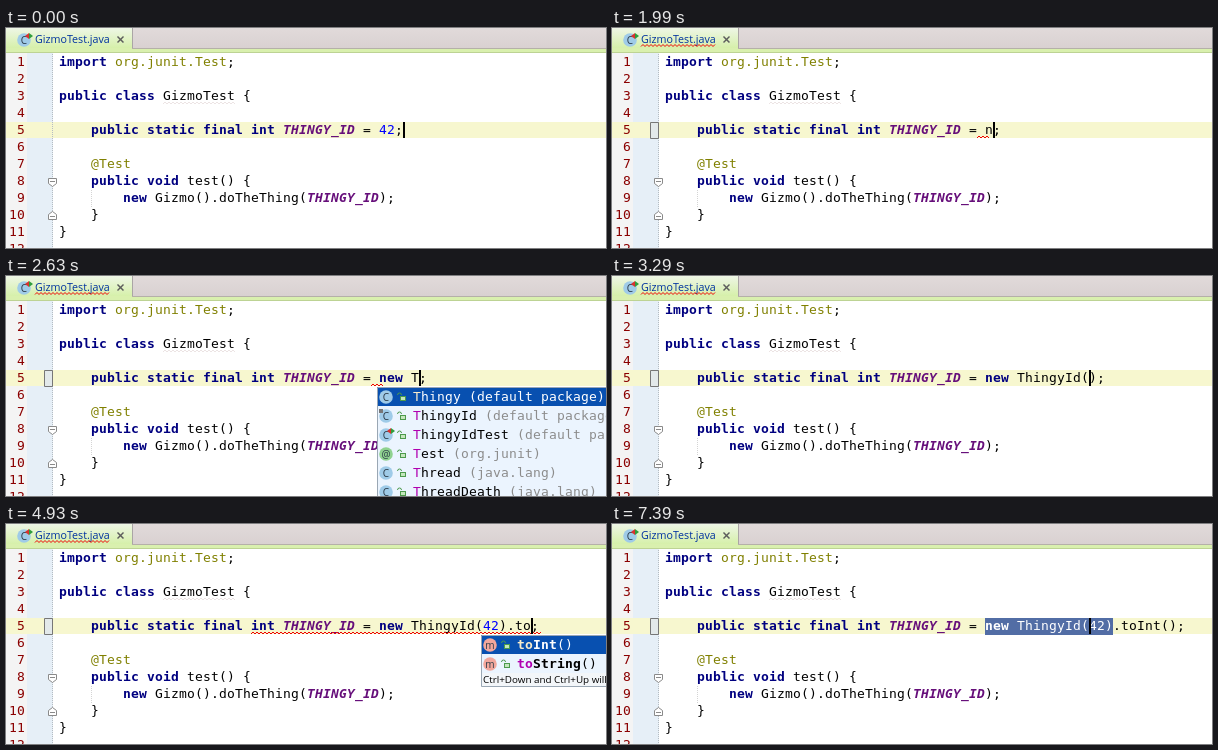
Animation, 600 px wide and 220 px high, one loop 8 s. Source, as an HTML page with a canvas:

```html
<!DOCTYPE html>
<html lang="en">
<head>
<meta charset="utf-8">
<title>Editor typing</title>
<style>
html, body { margin: 0; width: 100%; height: 100%; overflow: hidden; background: #fff; }
canvas { display: block; }
</style>
</head>
<body>
<canvas id="stage" width="600" height="220"></canvas>
<script>
const ctx = document.getElementById('stage').getContext('2d');
const LOOP = 8000, CELL = 8, ROW = 17, ASCENT = 12, LEFT = 53, EXPR = 373, CARET_ROW = 5;
const MONO = '13px "DejaVu Sans Mono", monospace';
const UI = '"Open Sans", sans-serif';
const ERROR = '#f00000';

// token styles: [font prefix, colour]
const STYLE = {
  k: ['bold ', '#000080'],
  c: ['bold italic ', '#660e7a'],
  a: ['', '#808000'],
  n: ['', '#0000ff'],
  p: ['', '#000']
};

const LINES = [
  [['k', 'import '], ['a', 'org.junit.Test'], ['p', ';']],
  [],
  [['k', 'public class '], ['p', 'GizmoTest {']],
  [],
  [['k', '    public static final int '], ['c', 'THINGY_ID'], ['p', ' =']],
  [],
  [['a', '    @Test']],
  [['k', '    public void '], ['p', 'test() {']],
  [['k', '        new '], ['p', 'Gizmo().doTheThing('], ['c', 'THINGY_ID'], ['p', ');']],
  [['p', '    }']],
  [['p', '}']]
];

// popup items: [icon, name, tail, matched prefix letters, mark]
const pkg = ' (default package)';
const method = (name, tail = '()', hit = 0) => ['m', name, tail, hit ? [0, 1] : []];
const POPUPS = {
  ne: { x: 337, items: [
    ['', 'new', '', [0, 1]],
    ['C', 'NegativeArraySizeException', ' (java.lang)', [0, 1]],
    ['C', 'NoSuchFieldError', ' (java.lang)', [0]],
    ['C', 'NoSuchMethodError', ' (java.lang)', [0]],
    ['C', 'NumberFormatException', ' (java.lang)', [0]],
    ['C', 'NullPointerException', ' (java.lang)', [0]]] },
  new: { x: 337, hint: true, items: [['', 'new', '', [0, 1, 2]]] },
  T: { x: 371, items: [
    ['C', 'Thingy', pkg, [0]],
    ['C', 'ThingyId', pkg, [0], 'pin'],
    ['C', 'ThingyIdTest', pkg, [0], 'run'],
    ['@', 'Test', ' (org.junit)', [0]],
    ['C', 'Thread', ' (java.lang)', [0]],
    ['C', 'ThreadDeath', ' (java.lang)', [0]]] },
  TI: { x: 371, hint: true, items: [
    ['C', 'ThingyId', pkg, [0, 6], 'pin'],
    ['C', 'ThingyIdTest', pkg, [0, 6], 'run']] },
  dot: { x: 475, items: [
    method('toInt'), method('equals', '(Object obj)'), method('hashCode'),
    method('toString'), method('getClass'), method('notify')] },
  to: { x: 475, hint: true, items: [method('toInt', '()', 1), method('toString', '()', 1)] }
};

const MADE = 'new ThingyId(42)', DONE = MADE + '.toInt();';
// each step: [time, expression, caret column, extras]
const STEPS = [
  [0, '42;', 3],
  [500, '42;', 2],
  [830, '42;', 2, { sel: [0, 2] }],
  [1330, ';', 0],
  [1660, ';', 0, { squiggle: 'gap' }],
  [1990, 'n;', 1, { squiggle: 'gap' }],
  [2150, 'ne;', 2, { squiggle: 'gap', popup: 'ne' }],
  [2310, 'new;', 3, { squiggle: 'gap', popup: 'new' }],
  [2470, 'new ;', 4, { squiggle: 'gap' }],
  [2630, 'new T;', 5, { squiggle: 'gap', popup: 'T' }],
  [2790, 'new TI;', 6, { squiggle: 'gap', popup: 'TI' }],
  [3290, 'new ThingyId();', 13],
  [3450, 'new ThingyId(4);', 14],
  [3610, MADE + ';', 15],
  [3940, MADE + ';', 15, { squiggle: 'all' }],
  [4100, MADE + ';', 16, { squiggle: 'all', braces: [12, 15] }],
  [4430, MADE + '.;', 17, { squiggle: 'all', popup: 'dot' }],
  [4930, MADE + '.to;', 19, { squiggle: 'all', popup: 'to' }],
  [5430, DONE, 24, { squiggle: 'all', braces: [22, 23] }],
  [5760, DONE, 24, { braces: [22, 23] }],
  [6260, DONE, 22, { braces: [22, 23] }],
  [6420, DONE, 17],
  [6580, DONE, 16, { braces: [12, 15] }],
  [6740, DONE, 13],
  [6900, DONE, 13, { sel: [13, 15] }],
  [7060, DONE, 13, { sel: [12, 16] }],
  [7390, DONE, 13, { sel: [0, 16] }]
];

const rowTop = n => 26 + ROW * (n - 1);
const baseline = n => rowTop(n) + ASCENT;

function rect(x, y, w, h, fill) {
  ctx.fillStyle = fill;
  ctx.fillRect(x, y, w, h);
}

function shade(x, y, w, h, from, to) {
  const g = ctx.createLinearGradient(0, y, 0, y + h);
  g.addColorStop(0, from);
  g.addColorStop(1, to);
  rect(x, y, w, h, g);
}

function path(points, stroke, fill, close, width = 1) {
  ctx.beginPath();
  points.forEach(([x, y]) => ctx.lineTo(x, y));
  if (close) ctx.closePath();
  if (fill) { ctx.fillStyle = fill; ctx.fill(); }
  if (stroke) { ctx.strokeStyle = stroke; ctx.lineWidth = width; ctx.stroke(); }
}

// monospaced text on the character grid; returns the next x
function mono(text, x, y, weight, fill) {
  ctx.font = weight + MONO;
  ctx.fillStyle = fill;
  for (const ch of text) {
    if (ch !== ' ') ctx.fillText(ch, x, y);
    x += CELL;
  }
  return x;
}

function label(text, x, y, size, fill, align = 'left') {
  ctx.font = size + 'px ' + UI;
  ctx.fillStyle = fill;
  ctx.textAlign = align;
  ctx.fillText(text, x, y);
  ctx.textAlign = 'left';
}

function wave(from, to, y, color) {
  const points = [];
  for (let x = from, i = 0; x <= to; x += 2, i++) points.push([x, y + (i % 2 ? 0 : 2)]);
  path(points, color);
}

function disc(letter, x, y, mark) {
  const fill = { C: '#9fcbe8', '@': '#8fd28f', m: '#f2a79c' }[letter];
  ctx.beginPath();
  ctx.arc(x, y, 6.8, 0, 7);
  ctx.fillStyle = fill;
  ctx.fill();
  label(letter, x, y + 3.5, 10, '#2b3a48', 'center');
  if (mark === 'run') {
    path([[x + 1, y - 4], [x + 5, y - 7], [x + 5, y - 1]], null, '#d9322e', true);
    path([[x + 5, y - 7], [x + 9, y - 4], [x + 5, y - 1]], null, '#2f9e3c', true);
  }
  if (mark === 'pin') rect(x - 7, y - 7, 4, 4, '#777');
}

function lock(x, y) {
  ctx.beginPath();
  ctx.arc(x - 1.5, y - 2, 2, Math.PI, 0);
  ctx.strokeStyle = '#4c9a4c';
  ctx.lineWidth = 1;
  ctx.stroke();
  rect(x - 1, y - 1, 6, 5, '#4c9a4c');
  rect(x, y, 4, 3, '#c4e6bd');
}

function tabs(error) {
  shade(0, 0, 600, 20, '#e1dada', '#d9d1d1');
  shade(0, 0, 126, 20, '#eef6e6', '#d6f0aa');
  rect(0, 20, 600, 5, '#d9f0ae');
  rect(126, 0, 1, 20, '#aaa5a5');
  rect(126, 20, 474, 1, '#b5b0a8');
  rect(0, 24, 600, 1, '#bdd394');
  disc('C', 18, 12, 'run');
  label('GizmoTest.java', 29, 15, 10.7, '#0032a0');
  if (error) wave(29, 104, 16.5, ERROR);
  path([[111.5, 8.5], [117.5, 14.5]], '#5c5c5c', null, false, 1.5);
  path([[117.5, 8.5], [111.5, 14.5]], '#5c5c5c', null, false, 1.5);
}

function foldMark(y, dir) {
  path([[42.5, y - 4 * dir], [50.5, y - 4 * dir], [50.5, y + dir], [46.5, y + 4 * dir], [42.5, y + dir]],
    '#8a8a8a', '#fff', true);
  path([[44, y - dir], [49, y - dir]], '#8a8a8a');
}

function gutter(changed) {
  rect(0, 25, 21, 195, '#f4f4f4');
  rect(21, 25, 26, 195, '#e6eff7');
  rect(0, rowTop(CARET_ROW), 600, ROW - 1, '#f7f7cf');
  for (let y = 26; y < 220; y += 2) rect(46, y, 1, 1, '#b5bcc2');
  if (changed) path([[46.5, 94.5], [38.5, 94.5], [38.5, 110.5], [46.5, 110.5]], '#777', '#e3e9ea', true);
  foldMark(154.5, 1);
  foldMark(187.5, -1);
  for (let n = 1; n <= 12; n++) {
    const s = String(n);
    mono(s, 19 - CELL * s.length, baseline(n), '', '#8b0000');
  }
}

function source() {
  LINES.forEach((tokens, i) => {
    let x = LEFT;
    for (const [kind, text] of tokens) x = mono(text, x, baseline(i + 1), ...STYLE[kind]);
  });
  for (let y = 162; y < 179; y += 2) rect(85, y, 1, 1, '#d4d4d4');
  wave(157, 229, 74, '#ece4e4');
}

function expression(code, caret, { sel, braces, squiggle }) {
  const top = rowTop(CARET_ROW), at = col => EXPR + col * CELL;
  if (braces) braces.forEach(col => rect(at(col), top, CELL, ROW, '#99ccff'));
  if (sel) rect(at(sel[0]), top, (sel[1] - sel[0]) * CELL, ROW, '#526da5');
  let col = 0;
  for (const word of code.match(/\d+|\w+|\W/g)) {
    const kind = word === 'new' ? 'k' : /^\d/.test(word) ? 'n' : 'p';
    const [weight, color] = STYLE[kind];
    const inside = sel && col >= sel[0] && col < sel[1];
    mono(word, at(col), baseline(CARET_ROW), weight, inside ? '#fff' : color);
    col += word.length;
  }
  if (squiggle === 'gap') wave(365, 377, top + 14, ERROR);
  if (squiggle === 'all') wave(245, at(code.length) + 2, top + 14, ERROR);
  rect(at(caret), top, 2, ROW - 1, '#000');
}

function popup({ x, items, hint }) {
  const top = 111, h = 19, bottom = top + items.length * h + (hint ? 14 : 0);
  rect(x, top, 600 - x, bottom - top, '#ebf4fe');
  items.forEach(([icon, name, tail, hits, mark], i) => {
    const y = top + i * h, picked = i === 0;
    if (picked) rect(x, y, 600 - x, h, '#0850b0');
    if (icon) {
      disc(icon, x + 9, y + 10, mark);
      lock(x + 24, y + 10);
    }
    const weight = icon === 'm' || !icon ? 'bold ' : '';
    const plain = picked ? '#fff' : '#000';
    let tx = x + 36;
    [...name].forEach((ch, k) => {
      const color = hits.includes(k) ? (picked ? '#f9eccc' : '#b000b0') : plain;
      tx = mono(ch, tx, y + 14, weight, color);
    });
    mono(tail, tx, y + 14, '', icon === 'm' || picked ? plain : '#8c8c8c');
  });
  if (hint) {
    rect(x, bottom - 14, 600 - x, 14, '#f3f6f9');
    label('Ctrl+Down and Ctrl+Up will move caret down and up in the editor', x + 2, bottom - 4, 9.85, '#000');
  }
  path([[600, top + 0.5], [x + 0.5, top + 0.5], [x + 0.5, bottom - 0.5], [600, bottom - 0.5]], '#9aa7b4');
}

function draw(t) {
  const [, code, caret, extras = {}] = STEPS.findLast(step => step[0] <= t);
  rect(0, 0, 600, 220, '#fff');
  gutter(t >= 1660);
  source();
  expression(code, caret, extras);
  tabs(t >= 1660 && t < 5760);
  if (extras.popup) popup(POPUPS[extras.popup]);
}

const start = performance.now();
function tick() {
  draw((performance.now() - start) % LOOP);
  requestAnimationFrame(tick);
}
tick();
</script>
</body>
</html>
```
